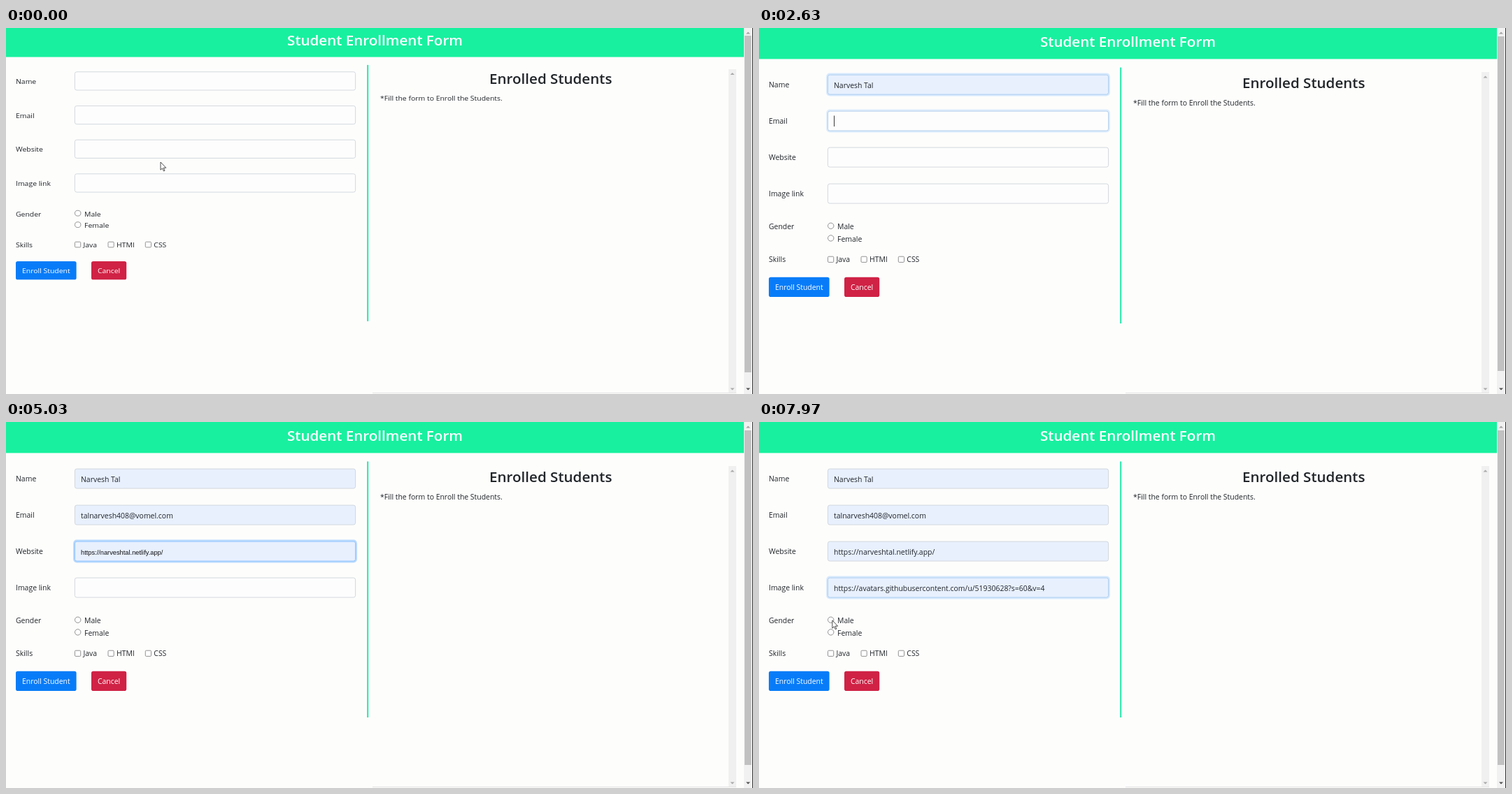
Animation, 1068 px wide and 524 px high, one loop 8 s. Source, as an HTML page:

```html
<!DOCTYPE html>
<html lang="en">
<head>
<meta charset="utf-8">
<title>Student Enrollment Form</title>
<style>
  html, body { margin: 0; width: 100%; height: 100%; overflow: hidden; background: #fdfdfc; }
  svg { display: block; width: 100%; height: 100%; }
  text { font: 10.45px "Open Sans", "Noto Sans", sans-serif; fill: #212529; white-space: pre; }
  .head { font-size: 20.6px; font-weight: 600; text-anchor: middle; }
  .btn { fill: #fff; text-anchor: middle; }
  .white { fill: #fff; }
  .hint { font: 9.27px "Liberation Sans", Arial, sans-serif; fill: #111; }
  .box { fill: #fff; stroke: #767676; stroke-width: .8; }
</style>
</head>
<body>
<svg id="stage" viewBox="0 0 1068 524" preserveAspectRatio="none"></svg>
<script>
const LOOP = 8000, SETTLE = 270, SQUASH = 0.936;
const stage = document.getElementById('stage');

function add(parent, tag, attrs, text) {
  const el = document.createElementNS('http://www.w3.org/2000/svg', tag);
  for (const k in attrs) el.setAttribute(k, attrs[k]);
  if (text) el.textContent = text;
  parent.appendChild(el);
  return el;
}
const rect = (p, x, y, width, height, fill, more) =>
  add(p, 'rect', { x, y, width, height, fill, ...more });
const label = (p, x, y, text, cls = '') => add(p, 'text', { x, y, class: cls }, text);
const show = (el, on) => el.setAttribute('visibility', on ? 'visible' : 'hidden');

// Page content, slightly squashed until the window settles
const page = add(stage, 'g', {});
rect(page, 0, 0, 1055, 44.4, '#18f09f');
label(page, 527.5, 27.2, 'Student Enrollment Form', 'head white');
label(page, 778.7, 86, 'Enrolled Students', 'head');
label(page, 535, 110.8, '*Fill the form to Enroll the Students.');
const divider = rect(page, 516.2, 56.5, 2, 366.5, '#22e8a8');

// focus, hint, fill and blur are times in ms
const fields = [
  { name: 'Name', y: 67, value: 'Narvesh Tal', focus: 950, hint: 1370, fill: 1900, blur: 2560 },
  { name: 'Email', y: 119, value: 'talnarvesh408@vomel.com', focus: 2560, hint: 2970, fill: 3530, blur: 4090 },
  { name: 'Website', y: 171, value: 'https://narveshtal.netlify.app/', focus: 4090, hint: 4530, fill: 5100, blur: 5720 },
  { name: 'Image link', y: 223, value: 'https://avatars.githubusercontent.com/u/51930628?s=60&v=4', focus: 5720, hint: 6130, fill: 6990, blur: 7900 }
];
for (const f of fields) {
  label(page, 14, f.y + 18.4, f.name);
  f.glow = rect(page, 97.2, f.y - 1.3, 403.6, 30.6, 'none',
    { rx: 4, stroke: '#007bff', 'stroke-opacity': .28, 'stroke-width': 2.2 });
  f.box = rect(page, 98.4, f.y + .1, 401.2, 28, '#fff', { rx: 2.8, 'stroke-width': .9 });
  f.caret = rect(page, 107, f.y + 6.5, .9, 15.5, '#222');
  f.preview = label(page, 107, f.y + 18.7, f.value, 'hint');
  f.text = label(page, 107, f.y + 18.7, f.value);
}

label(page, 14, 288.2, 'Gender');
['Male', 'Female'].forEach((s, i) => {
  add(page, 'circle', { cx: 102.7, cy: 283.3 + i * 17.6, r: 4.2, class: 'box' });
  label(page, 112, 288.2 + i * 17.6, s);
});
label(page, 14, 335.4, 'Skills');
[['Java', 98.5], ['HTMl', 146], ['CSS', 199.3]].forEach(([s, x]) => {
  rect(page, x, 327.2, 8.2, 8.2, '#fff', { rx: 1.2, class: 'box' });
  label(page, x + 12, 335.4, s);
});
[['Enroll Student', 14, 86.6, '#087cf8'], ['Cancel', 122, 50.2, '#d02245']].forEach(([s, x, w, fill]) => {
  rect(page, x, 356.8, w, 28.2, fill, { rx: 2.8 });
  label(page, x + w / 2, 375.3, s, 'btn');
});

// Scrollbars
const arrow = (x, y, dir, fill) =>
  add(stage, 'path', { d: `M${x - 3} ${y + 1.5 * dir}h6l-3 ${-3 * dir}z`, fill });
rect(stage, 524, 522, 520, 1, '#e4e4e4');
const track = rect(stage, 1033, 63, 11, 459, '#f0f0f0');
const trackUp = arrow(1038.5, 70, 1, '#a9a9a9');
arrow(1038.5, 517, -1, '#a9a9a9');
rect(stage, 1055, 0, 12, 524, '#f1f1f1');
const thumb = rect(stage, 1056, 12, 9.5, 479, '#c1c1c1');
arrow(1061, 7, 1, '#a3a3a3');
arrow(1061, 517, -1, '#505050');
rect(stage, 1067, 0, 1, 524, '#333');

// Pointer, hidden over text fields and popups
const pointer = add(stage, 'path', {
  d: 'M0 0V11.2L2.6 8.8L4.4 12.8L6 12.1L4.3 8.2H7.8Z',
  fill: '#fff', stroke: '#222', 'stroke-width': .8, 'stroke-linejoin': 'round'
});
const path = [
  [0, 221, 192], [70, 221, 192], [530, 180, 82], [1370, 170, 106],
  [1900, 166, 106], [2170, 160, 121], [3570, 150, 164], [3730, 151, 166], [3900, 157, 171],
  [5030, 168, 214], [5170, 165, 218], [5370, 164, 219], [5430, 160, 226],
  [6970, 160, 268], [7250, 140, 298], [7550, 112, 292], [7770, 104.8, 284], [8000, 104.8, 284]
];
const shown = [[0, 530], [1900, 2170], [3730, 3900], [5100, 5430], [6970, 8000]];

const clamp = v => Math.max(0, Math.min(1, v));
const ease = v => v * v * (3 - 2 * v);
const mix = (a, b, k) => a + (b - a) * k;

function pointAt(t) {
  const i = Math.max(1, path.findIndex(p => p[0] > t));
  const a = path[i - 1], b = path[i];
  const k = ease((t - a[0]) / (b[0] - a[0]));
  return [mix(a[1], b[1], k), mix(a[2], b[2], k)];
}

function draw(t) {
  const early = t < SETTLE, sy = early ? SQUASH : 1;
  page.setAttribute('transform', `scale(1 ${sy})`);
  divider.setAttribute('height', early ? 392 : 366.5);
  track.setAttribute('y', 63 * sy);
  track.setAttribute('height', 522 - 63 * sy);
  trackUp.setAttribute('transform', `translate(0 ${early ? -4.5 : 0})`);
  thumb.setAttribute('y', early ? 11 : 12);
  thumb.setAttribute('height', early ? 482 : 479);

  for (const f of fields) {
    const k = ease(clamp((t - f.focus) / 150)) - ease(clamp((t - f.blur) / 150));
    f.glow.setAttribute('opacity', k);
    f.box.setAttribute('stroke', `rgb(${mix(206, 128, k)},${mix(212, 189, k)},${mix(218, 255, k)})`);
    f.box.setAttribute('fill', t >= f.hint ? '#e8f0fe' : '#fdfdfd');
    show(f.caret, t >= f.focus && t < f.hint);
    show(f.preview, t >= f.hint && t < f.fill);
    show(f.text, t >= f.fill);
  }

  const [x, y] = pointAt(t);
  const over = fields.some(f => y >= f.y * sy && y <= (f.y + 28) * sy);
  show(pointer, !over && shown.some(([a, b]) => t >= a && t < b));
  pointer.setAttribute('transform', `translate(${x} ${y})`);
}

const start = performance.now();
function tick() {
  draw((performance.now() - start) % LOOP);
  requestAnimationFrame(tick);
}
tick();
</script>
</body>
</html>
```
